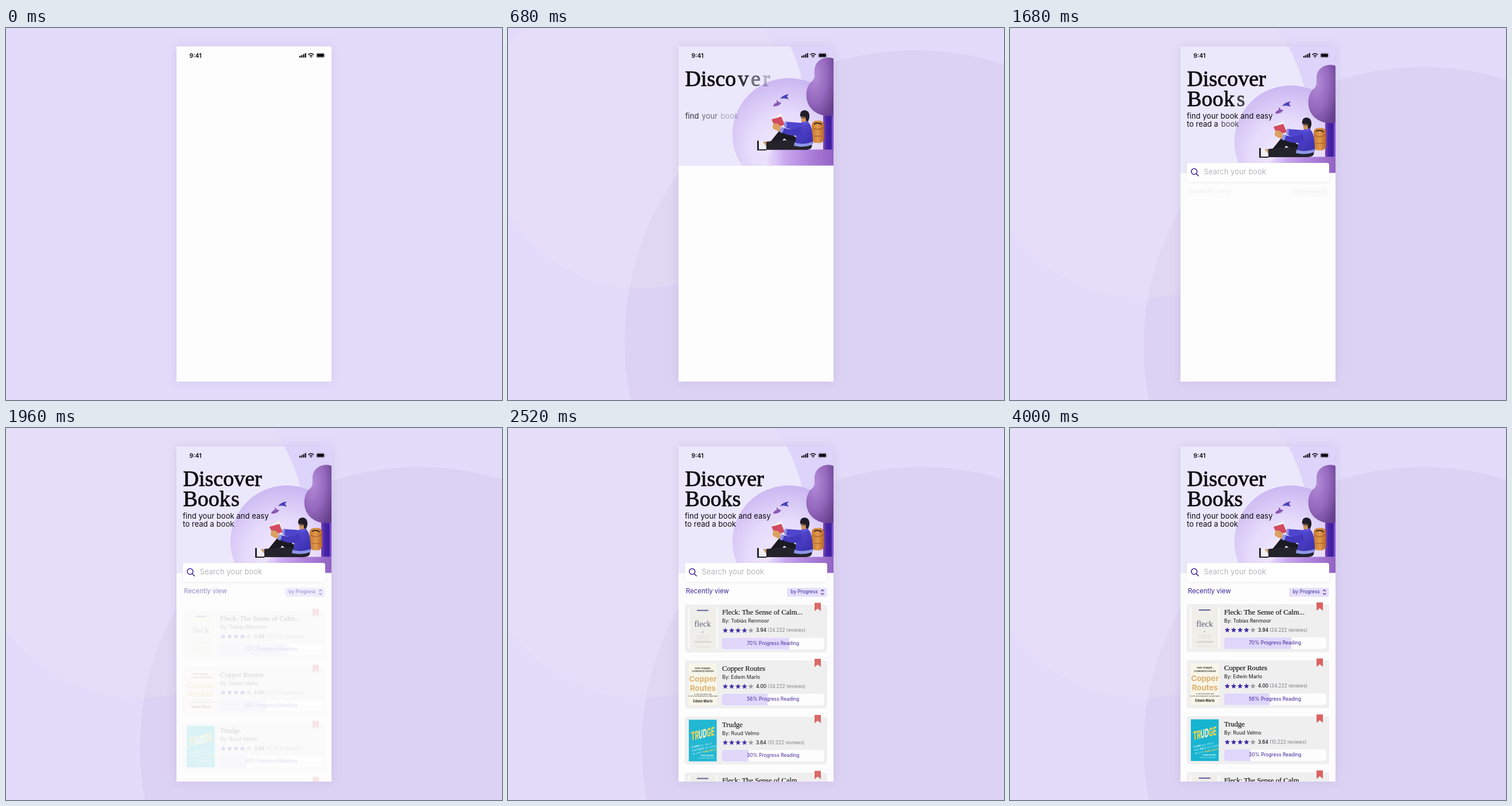
Animation of 864x648 px, one loop 4040 ms. Source, as an HTML page:

```html
<!DOCTYPE html>
<html lang="en">
<head>
<meta charset="utf-8">
<title>Discover Books</title>
<style>
html, body { margin: 0; width: 100%; height: 100%; overflow: hidden; background: #e3dbfa; }
svg { display: block; width: 100vw; height: 100vh; font-family: Inter, "Open Sans", sans-serif; }
text { white-space: pre; }
.serif { font-family: "Liberation Serif", "Noto Serif", serif; }
.big { font-size: 38px; stroke: #0b0a10; stroke-width: .8px; fill: #0b0a10; }
.sub { font-size: 13.1px; fill: #0b0a10; }
.mid { text-anchor: middle; }
.violet { fill: #3c2199; }
.phone { filter: drop-shadow(0 0 8px rgba(95, 75, 150, .14)); }
.bar { filter: drop-shadow(0 1px 2px rgba(80, 60, 140, .1)); }
</style>
</head>
<body>
<svg viewBox="0 0 864 648" xmlns="http://www.w3.org/2000/svg">
<defs>
  <clipPath id="screen"><rect x="297" y="32" width="270" height="584"/></clipPath>
  <radialGradient id="dome" gradientUnits="userSpaceOnUse" cx="482" cy="224" r="128">
    <stop offset="0" stop-color="#f1eafe"/><stop offset=".5" stop-color="#e6dbfb"/><stop offset="1" stop-color="#c9b4f1"/>
  </radialGradient>
  <linearGradient id="ground">
    <stop offset="0" stop-color="#d9c3f6" stop-opacity=".3"/><stop offset=".25" stop-color="#cbaaf0"/>
    <stop offset=".65" stop-color="#ac7fd9"/><stop offset="1" stop-color="#9362c3"/>
  </linearGradient>
  <radialGradient id="leaf" cx=".3" cy=".3" r=".85">
    <stop offset="0" stop-color="#b48cd8"/><stop offset=".55" stop-color="#9468bd"/><stop offset="1" stop-color="#67408f"/>
  </radialGradient>
  <linearGradient id="trunk">
    <stop offset="0" stop-color="#7a48b8"/><stop offset=".35" stop-color="#4a24a6"/>
    <stop offset=".8" stop-color="#3b1c9c"/><stop offset=".85" stop-color="#8a55d8"/><stop offset="1" stop-color="#7745c4"/>
  </linearGradient>
  <linearGradient id="coat" x2=".6" y2="1">
    <stop offset="0" stop-color="#5b50d8"/><stop offset="1" stop-color="#3a2fae"/>
  </linearGradient>
  <linearGradient id="pack">
    <stop offset="0" stop-color="#c9792f"/><stop offset=".5" stop-color="#e09a4c"/><stop offset="1" stop-color="#b8672a"/>
  </linearGradient>
</defs>

<circle id="dark" fill="#dcd2f3"/>
<circle id="pale" cx="234" cy="179" fill="#eeecf0" fill-opacity=".2"/>
<rect class="phone" x="297" y="32" width="270" height="584" fill="#fdfdfd"/>

<g clip-path="url(#screen)">
  <g id="hero">
    <rect x="297" y="32" width="270" height="220.5" fill="#ddd4fb"/>
    <g clip-path="url(#heroBox)">
      <circle cx="231" cy="170" r="289" fill="#ece8fc"/>
      <circle cx="489" cy="198" r="98" fill="url(#dome)"/>
      <path d="M456 252.5Q444 238 462 224.5H567V252.5Z" fill="url(#ground)"/>
    </g>
    <rect x="549" y="155" width="18" height="69.5" fill="url(#trunk)"/>
    <path d="M567 66C556 61 535 66 534 86C533 95 536 99 530 105C519 113 516 134 525 149C534 163 552 168 567 165Z" fill="url(#leaf)"/>
    <path d="M474 136Q479 129 489 128L486 132L489 137Q481 134 474 136Z" fill="#4b41bd"/>
    <path d="M462 149Q463 144 468 143L468 138L472 142L476 143Q472 150 462 149Z" fill="#8a58b4"/>

    <!-- reader -->
    <path d="M457 211L474 190Q481 186 489 194L512 211L500 219L481 205L470 219Z" fill="#1b1a22"/>
    <path d="M448 211Q480 206 518 210L529 214Q532 225 517 225H449Z" fill="#24232b"/>
    <path d="M444 211H450V223H445Z" fill="#d19a63"/>
    <path d="M435 209H442L450 219V225.5H435Z" fill="#f1eff5"/>
    <path d="M434 209H437V224H450V226H434Z" fill="#26242e"/>
    <rect x="529" y="174" width="21.500" height="39" rx="8" fill="url(#pack)"/>
    <path d="M531 187Q540 192 550 186M533 201H548" fill="none" stroke="#a85c25" stroke-width="1.200"/>
    <path d="M533 180Q540 176 546 181" fill="none" stroke="#3a241c" stroke-width="2"/>
    <path d="M503 182Q511 175 523 177Q531 183 531 214Q515 221 499 216Q504 204 500 194Z" fill="url(#coat)"/>
    <path d="M499 212Q515 217 530 211V216Q515 222 498 218Z" fill="#8d96e6"/>
    <path d="M512 178L484 176Q479 181 484 187L508 193Z" fill="#4f45cd"/>
    <path d="M510 184Q496 193 478 186L476 194Q494 204 513 198Z" fill="#4339bd"/>
    <path d="M476 185L481 187L478 196L473 194Z" fill="#8d96e6"/>
    <path d="M482 176L486 175L485 187L481 185Z" fill="#8d96e6"/>
    <path d="M462 170L476 161L481 177L467 181Z" fill="#f3efef"/>
    <path d="M459 172L476 167L482 181L466 187Z" fill="#d14b60"/>
    <path d="M462 179Q469 177 475 184L474 193Q466 191 461 187Z" fill="#dba05f"/>
    <path d="M511 164H521V178Q515 180 511 175Z" fill="#cf945f"/>
    <path d="M509 167Q508 156 517 156Q526 157 525 169L522 178Q518 176 519 168Z" fill="#201d28"/>
    <path d="M510 169H519" stroke="#201d28" stroke-width="1"/>
    <path d="M512 176Q517 178 522 174L524 178Q518 183 511 180Z" fill="#5a50d6"/>
  </g>

  <g id="status" fill="#0b0a10">
    <text x="319.500" y="51.500" font-size="10.500" font-weight="600">9:41</text>
    <path d="M511 48.500h2.200v3H511zM514.200 47.200h2.200v4.300h-2.200zM517.400 45.500h2.200v6h-2.200zM520.600 43.800h2.200v7.700h-2.200z"/>
    <path d="M526.500 46.700Q531.300 42.300 536.100 46.700M528.600 49Q531.300 46.500 534 49" fill="none" stroke="#0b0a10" stroke-width="1.600"/>
    <path d="M529.800 50.200Q531.300 49 532.800 50.200L531.300 51.700Z"/>
    <rect x="540.500" y="43.700" width="14.500" height="8" rx="2.200" fill="none" stroke="#9b98a6" stroke-width=".8"/>
    <rect x="541.600" y="44.800" width="12.300" height="5.800" rx="1.200"/>
    <path d="M556 46.300q1.200 1.400 0 2.800z" fill="#9b98a6"/>
  </g>

  <text class="serif big" x="308.500" y="100.500" id="line1"></text>
  <text class="serif big" x="308.500" y="136" id="line2"></text>
  <text class="sub" x="308" y="157.500" id="sub1"></text>
  <text class="sub" x="308" y="172" id="sub2"></text>

  <g id="search">
    <rect class="bar" x="308" y="235" width="248" height="33" rx="4" fill="#fff"/>
    <g fill="none" stroke="#3c2199" stroke-width="1.500" stroke-linecap="round">
      <circle cx="320.800" cy="250" r="5"/><path d="M324.600 254L328.300 257.700"/>
    </g>
    <text x="337.500" y="254.500" font-size="13" fill="#b6b5ba">Search your book</text>
  </g>

  <g id="heading">
    <text class="violet" x="310" y="288" font-size="11.400">Recently view</text>
    <rect x="486" y="278.500" width="69.500" height="15.500" rx="3" fill="#e6dffc"/>
    <text class="violet" x="492.500" y="287.500" font-size="8.400">by Progress</text>
    <path d="M545.300 284.300L547.700 281.800L550.100 284.300M545.300 287.700L547.700 290.200L550.100 287.700" fill="none" stroke="#3c2199" stroke-width="1.100"/>
  </g>

  <g id="cards"></g>
</g>
<defs><clipPath id="heroBox"><rect x="297" y="32" width="270" height="220.500"/></clipPath></defs>
</svg>

<script>
const LOOP = 4040, STEP = 40;
const $ = id => document.getElementById(id);
const mix = (a, b, p) => a + (b - a) * p;
const clamp = v => Math.min(1, Math.max(0, v));
const easeOut = (t, start, length) => 1 - (1 - clamp((t - start) / length)) ** 2;

const label = (x, y, size, fill, str, more = '') =>
  `<text x="${x}" y="${y}" font-size="${size}" fill="${fill}" ${more}>${str}</text>`;
const MID = 'class="mid"', SERIF_MID = 'class="serif mid"';

// Covers are drawn relative to the top left corner of their card.
function fleckCover() {
  return `<rect x="5.500" y="5" width="52" height="73" fill="#fafafa"/>
    <rect x="8.500" y="5" width="46" height="73" fill="#efeee8"/>
    <rect x="21" y="9.300" width="20" height="2" fill="#5b5c9c"/>` +
    label(31, 39, 14.5, '#555b78', 'fleck', SERIF_MID) +
    `<circle cx="31" cy="48" r="1.200" fill="#a9a8ad"/>` +
    label(31, 55.5, 2.9, '#a3a29f', 'The Sense of Calm', SERIF_MID) +
    label(31, 59.5, 2.9, '#a3a29f', 'in a Noisy World', SERIF_MID) +
    label(31, 67, 3.4, '#a3a29f', 'TOBIAS RENMOOR', SERIF_MID) +
    label(31, 74.5, 2.8, '#b0afab', 'with a new afterword', SERIF_MID);
}

function copperCover() {
  const black = '#2b2a28', gold = '#dfb06e';
  return `<rect x="7" y="5.500" width="49" height="72.500" fill="#f8f6e8"/>` +
    label(31.5, 14.8, 4, black, 'Slow Voyages,', MID + ' font-weight="600"') +
    label(31.5, 20.3, 4, black, 'Considered Detours', MID + ' font-weight="600"') +
    label(31.5, 37, 13.3, gold, 'Copper', MID + ' font-weight="700"') +
    label(31.5, 52.5, 13.3, gold, 'Routes', MID + ' font-weight="700"') +
    label(31.5, 59.5, 2.7, black, 'An Easy and Patient Way', MID) +
    label(31.5, 63.3, 2.7, black, 'to Find Good Roads and Lose Bad Maps', MID) +
    label(31.5, 72.8, 5.6, black, 'Edwin Marlo', MID + ' font-weight="700"');
}

function trudgeCover() {
  const sun = '#f6d44e', ink = '#e8f8fb';
  const tilt = (y, str, fill) => label(0, y, 4.4, fill, str, 'font-weight="600"');
  return `<rect x="7" y="5.500" width="48.500" height="72.500" fill="#17b4d1"/>
    <g transform="translate(11 42) skewY(-13) scale(1 2.100)">
      <text font-size="9.800" font-weight="800" fill="${sun}">TR<tspan fill="#f7f1c6">UD</tspan>GE</text></g>
    <g transform="translate(11.500 55) rotate(-11)">` +
    tilt(0, 'CLIMB <tspan fill="#9fe2ee">ALL HILLS</tspan>', ink) +
    tilt(6, '<tspan fill="#9fe2ee">AND</tspan> REST <tspan fill="#9fe2ee">AT LAKES</tspan>', ink) +
    tilt(12, '<tspan fill="#9fe2ee">IN JUST</tspan> NINE DAYS', sun) + '</g>' +
    label(51, 69, 3.4, ink, 'RUUD VELMO', 'text-anchor="end" font-weight="700"') +
    label(51, 73, 2.2, ink, 'with Ona Tills and Bo Wick', 'text-anchor="end"');
}

const BOOKS = [
  ['Fleck: The Sense of Calm...', 'Tobias Renmoor', '3.94', '24.222', 70, 117, fleckCover],
  ['Copper Routes', 'Edwin Marlo', '4.00', '34.222', 56, 79, copperCover],
  ['Trudge', 'Ruud Velmo', '3.64', '10.222', 30, 46, trudgeCover],
];

function star(cx, cy, fill) {
  const pts = Array.from({ length: 10 }, (_, i) => {
    const r = i % 2 ? 2.2 : 4.9, a = (i * 36 - 90) * Math.PI / 180;
    return (cx + r * Math.cos(a)).toFixed(2) + ',' + (cy + r * Math.sin(a)).toFixed(2);
  });
  return `<polygon points="${pts.join(' ')}" fill="${fill}"/>`;
}

function card([title, author, score, reviews, percent, fillWidth, cover], row) {
  const stars = [0, 1, 2, 3, 4].map(i => star(70.5 + i * 11.15, 45.3, i < 4 ? '#3d28a0' : '#9b9a9f')).join('');
  return `<g transform="translate(308 ${306.8 + row * 97.6})">
    <rect width="248" height="83.500" rx="4" fill="#efeff0"/>${cover()}` +
    label(65, 18, 12.6, '#111', title, 'class="serif" stroke="#111" stroke-width=".2"') +
    label(65, 32, 8.7, '#111', 'By: ' + author) + stars +
    label(124, 48, 8.3, '#111', score, 'font-weight="500"') +
    label(144, 48, 8.3, '#7c7b80', `(${reviews} reviews)`) +
    `<rect x="65" y="58" width="177.500" height="20" rx="4" fill="#fdfdfd"/>
    <path d="M69 58H${65 + fillWidth}V78H69Q65 78 65 74V62Q65 58 69 58Z" fill="#dfd6fb"/>` +
    label(153.7, 70.2, 8.45, '#3c2199', percent + '% Progress Reading', MID) +
    `<path d="M226 -3H237V11.500L231.500 7L226 11.500Z" fill="#da6261"/></g>`;
}

$('cards').innerHTML = [...BOOKS, BOOKS[0]].map(card).join('');

// Parts fade in one after another while sliding left to their place.
const SPREAD = 3.6;
function reveal(id, parts, first, total, start, length, shift) {
  const spans = parts.map(part => {
    const span = document.createElementNS('http://www.w3.org/2000/svg', 'tspan');
    span.textContent = part;
    return $(id).appendChild(span);
  });
  return t => {
    const reach = easeOut(t, start, length) * (total - 1 + SPREAD);
    let last = 0;
    spans.forEach((span, i) => {
      const p = clamp((reach - first - i) / SPREAD);
      const off = (1 - p) * shift;
      span.setAttribute('dx', off - last);
      span.setAttribute('fill-opacity', p);
      span.setAttribute('stroke-opacity', p);
      last = off;
    });
  };
}

const reveals = [
  reveal('line1', [...'Discover'], 0, 8, 279, 821, 14),
  reveal('line2', [...'Books'], 0, 5, 705, 1572, 13),
  reveal('sub1', ['find ', 'your ', 'book ', 'and ', 'easy'], 0, 9, 436, 1725, 5),
  reveal('sub2', ['to ', 'read ', 'a ', 'book'], 5, 9, 436, 1725, 6),
];

function set(id, attrs) {
  for (const key in attrs) $(id).setAttribute(key, attrs[key]);
}

function draw(t) {
  const intro = easeOut(t, 22, 865);
  set('dark', { cx: mix(540, 720, intro), cy: mix(388, 555, intro), r: mix(828, 487, intro), opacity: clamp(intro / .68) });
  set('pale', { r: 291 * intro });
  set('hero', { transform: `translate(0 ${-220.5 * (1 - intro)})` });
  reveals.forEach(show => show(t));

  const search = easeOut(t, 800, 700);
  set('search', {
    opacity: search,
    transform: `translate(432 251.5) scale(${mix(.66, 1, search)}) translate(-432 -251.5)`,
  });
  set('heading', { opacity: easeOut(t, 1650, 950) });

  const list = easeOut(t, 1900, 800);
  set('cards', { opacity: list, transform: `translate(0 ${13 * (1 - list)})` });
}

function tick() {
  const t = performance.now() % LOOP;
  draw(Math.floor(t / STEP) * STEP);
  requestAnimationFrame(tick);
}
tick();
</script>
</body>
</html>
```
